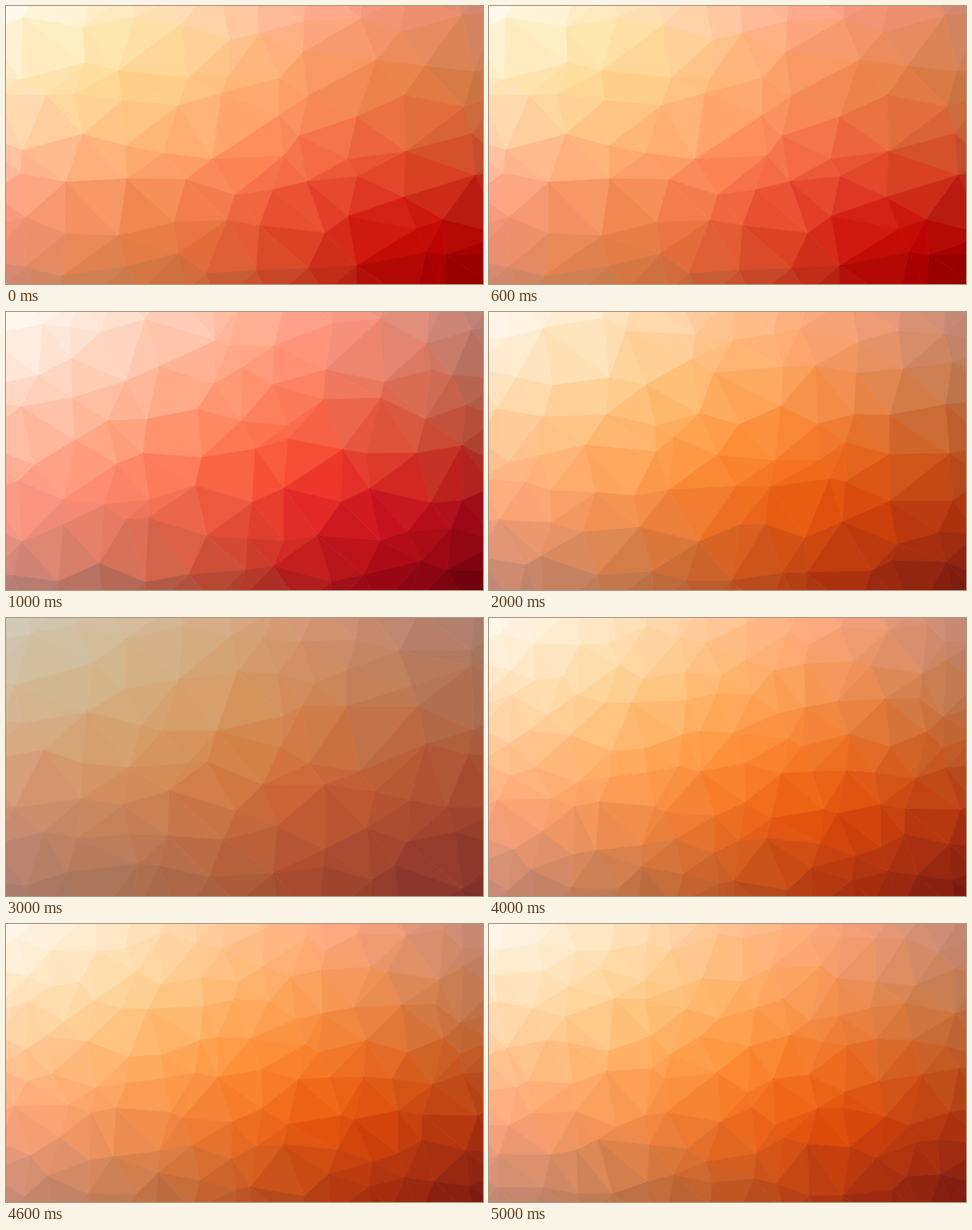
An HTML page with a canvas that plays this animation: 640 px wide and 374 px high, repeating every 6000 ms.

```html
<!DOCTYPE html>
<html lang="en">
<head>
<meta charset="utf-8">
<title>Low-poly gradients</title>
<style>
  html, body { margin: 0; width: 100%; height: 100%; overflow: hidden; }
  canvas { display: block; animation: advance 6s steps(6) infinite; }
  @keyframes advance { to { transform: translateY(-100%); } }
</style>
</head>
<body>
<canvas width="640" height="2244"></canvas>
<script>
const W = 640, H = 374;
const ctx = document.querySelector('canvas').getContext('2d');

// Colour: sRGB <-> Lab, so blends stay perceptually even.
const D65 = [0.95047, 1, 1.08883];

function toLab(hex) {
  const [r, g, b] = [1, 3, 5].map(i => {
    const c = parseInt(hex.slice(i, i + 2), 16) / 255;
    return c <= 0.04045 ? c / 12.92 : ((c + 0.055) / 1.055) ** 2.4;
  });
  const [x, y, z] = [
    0.4124564 * r + 0.3575761 * g + 0.1804375 * b,
    0.2126729 * r + 0.7151522 * g + 0.072175 * b,
    0.0193339 * r + 0.119192 * g + 0.9503041 * b
  ].map((v, i) => {
    const t = v / D65[i];
    return t > 0.008856 ? Math.cbrt(t) : 7.787 * t + 4 / 29;
  });
  return [116 * y - 16, 500 * (x - y), 200 * (y - z)];
}

function toCss([l, a, b]) {
  const fy = (l + 16) / 116;
  const [x, y, z] = [fy + a / 500, fy, fy - b / 200].map((t, i) =>
    D65[i] * (t > 6 / 29 ? t ** 3 : (t - 4 / 29) / 7.787));
  const rgb = [
    3.2404542 * x - 1.5371385 * y - 0.4985314 * z,
    -0.969266 * x + 1.8760108 * y + 0.041556 * z,
    0.0556434 * x - 0.2040259 * y + 1.0572252 * z
  ].map(c => {
    const v = c <= 0.0031308 ? 12.92 * c : 1.055 * c ** (1 / 2.4) - 0.055;
    return Math.round(255 * Math.min(1, Math.max(0, v)));
  });
  return `rgb(${rgb})`;
}

const mix = (p, q, t) => p.map((v, i) => v + (q[i] - v) * t);

function ramp(colors) {
  const stops = colors.split(' ').map(toLab);
  return t => {
    const s = Math.min(1, Math.max(0, t)) * (stops.length - 1);
    const i = Math.min(stops.length - 2, Math.floor(s));
    return mix(stops[i], stops[i + 1], s - i);
  };
}

const scarlet = ramp('#fff9ec #fdeec0 #fdd890 #fec080 #ff9460 #f2603f #d9261a #c00000 #900000');
const crimson = ramp('#fffaf5 #fde3d3 #fdc2a5 #fe9a75 #fc6d48 #f2352a #cd1420 #a50a14 #67000d');
const orange = ramp('#fff7ec #fee9c8 #fdd498 #fdb468 #fe9038 #f26a18 #d84508 #a83010 #7c1a10');
const clay = ramp('#d2cabb #d0bd9c #d4b183 #d69c66 #d48246 #cc6236 #b25030 #983c2e #7c3028');

// Seeded random numbers from 0 to 1 (mulberry32).
function randomFrom(seed) {
  return () => {
    seed = (seed + 0x6d2b79f5) | 0;
    let t = Math.imul(seed ^ (seed >>> 15), 1 | seed);
    t = (t + Math.imul(t ^ (t >>> 7), 61 | t)) ^ t;
    return ((t ^ (t >>> 14)) >>> 0) / 4294967296;
  };
}

// One point per grid cell, shifted at random; the outer cells lie off stage.
function scatter(cols, rows, seed) {
  const random = randomFrom(seed), points = [];
  const shift = () => 0.5 + (random() - 0.5) * 0.72;
  for (let row = -1; row <= rows; row++) {
    for (let col = -1; col <= cols; col++) {
      points.push([(col + shift()) * W / cols, (row + shift()) * H / rows]);
    }
  }
  return points;
}

// Delaunay triangulation by incremental insertion.
function triangle(a, b, c) {
  const bx = b[0] - a[0], by = b[1] - a[1], cx = c[0] - a[0], cy = c[1] - a[1];
  const d = 2 * (bx * cy - by * cx);
  const bb = bx * bx + by * by, cc = cx * cx + cy * cy;
  const ux = (cy * bb - by * cc) / d, uy = (bx * cc - cx * bb) / d;
  return { v: [a, b, c], x: a[0] + ux, y: a[1] + uy, r2: ux * ux + uy * uy };
}

function triangulate(points) {
  const outer = [[-9000, -8000], [9500, -8100], [300, 12000]];
  let mesh = [triangle(...outer)];
  for (const p of points) {
    const edges = [];
    mesh = mesh.filter(t => {
      if ((p[0] - t.x) ** 2 + (p[1] - t.y) ** 2 >= t.r2) return true;
      const [a, b, c] = t.v;
      for (const [m, n] of [[a, b], [b, c], [c, a]]) {
        const twin = edges.findIndex(e => e[0] === n && e[1] === m);
        if (twin < 0) edges.push([m, n]);
        else edges.splice(twin, 1);
      }
      return false;
    });
    for (const [m, n] of edges) mesh.push(triangle(m, n, p));
  }
  return mesh.map(t => t.v).filter(v => !v.some(p => outer.includes(p)));
}

function drawScene({ palette, cols, rows }, index) {
  ctx.save();
  ctx.translate(0, H * index);
  ctx.beginPath();
  ctx.rect(0, 0, W, H);
  ctx.clip();
  ctx.lineWidth = 0.7;
  ctx.lineJoin = 'round';
  for (const [a, b, c] of triangulate(scatter(cols, rows, index + 1))) {
    const x = (a[0] + b[0] + c[0]) / 3 / W, y = (a[1] + b[1] + c[1]) / 3 / H;
    ctx.fillStyle = ctx.strokeStyle = toCss(mix(palette(x), palette(y), 0.5));
    ctx.beginPath();
    ctx.moveTo(...a);
    ctx.lineTo(...b);
    ctx.lineTo(...c);
    ctx.closePath();
    ctx.fill();
    ctx.stroke();
  }
  ctx.restore();
}

[
  { palette: scarlet, cols: 10, rows: 7 },
  { palette: crimson, cols: 11, rows: 7 },
  { palette: orange, cols: 11, rows: 7 },
  { palette: clay, cols: 10, rows: 7 },
  { palette: orange, cols: 14, rows: 8 },
  { palette: orange, cols: 14, rows: 8 }
].forEach(drawScene);
</script>
</body>
</html>
```
